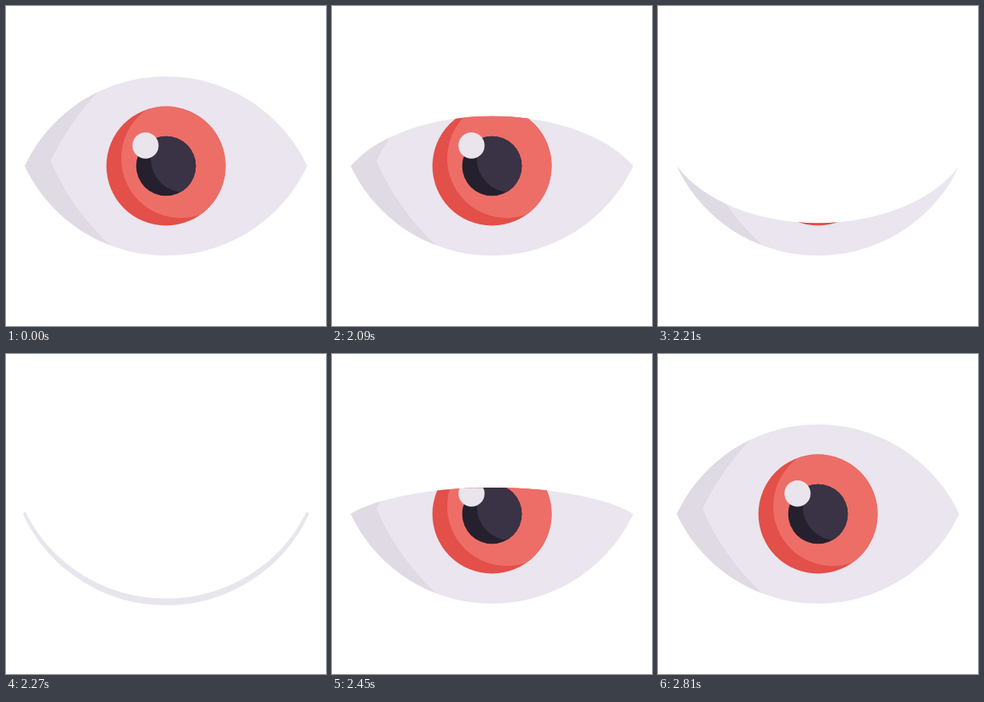
These frames come from a looping animation (400x400 px, 2840 ms). An HTML page without scripts:

```html
<!DOCTYPE html>
<html lang="en">
<head>
<meta charset="utf-8">
<title>Blinking eye</title>
<style>
  html, body { margin: 0; width: 100%; height: 100%; overflow: hidden; background: #fff; }
  svg { display: block; width: 100%; height: 100%; }

  .lid {
    d: path("M23.5 200 C55.7 131.6 124.4 88 200 88 C275.6 88 344.3 131.6 376.5 200 C344.3 268.4 275.6 312 200 312 C124.4 312 55.7 268.4 23.5 200 Z");
    animation: blink 2840ms infinite;
  }
  .lash {
    fill: none;
    stroke: #e9e5ec;
    stroke-width: 0;
    stroke-linejoin: round;
    animation: blink 2840ms infinite, thicken 2840ms linear infinite;
  }

  /* closes 2000-2300 ms, opens 2300-2800 ms */
  @keyframes blink {
    0%, 98.5915%, 100% {
      d: path("M23.5 200 C55.7 131.6 124.4 88 200 88 C275.6 88 344.3 131.6 376.5 200 C344.3 268.4 275.6 312 200 312 C124.4 312 55.7 268.4 23.5 200 Z");
    }
    70.4225% {
      d: path("M23.5 200 C55.7 131.6 124.4 88 200 88 C275.6 88 344.3 131.6 376.5 200 C344.3 268.4 275.6 312 200 312 C124.4 312 55.7 268.4 23.5 200 Z");
      animation-timing-function: cubic-bezier(.36, 0, .6, 1);
    }
    80.9859% {
      d: path("M23.5 200 C55.7 268.4 124.4 312 200 312 C275.6 312 344.3 268.4 376.5 200 C344.3 268.4 275.6 312 200 312 C124.4 312 55.7 268.4 23.5 200 Z");
      animation-timing-function: cubic-bezier(.3, 0, 0, 1);
    }
  }
  @keyframes thicken {
    0%, 78.8732%, 83.0986%, 100% { stroke-width: 0; }
    80.9859% { stroke-width: 8px; }
  }
</style>
</head>
<body>
<svg viewBox="0 0 400 400">
  <defs>
    <clipPath id="open"><path class="lid"/></clipPath>
    <clipPath id="iris"><circle cx="200" cy="200" r="74.5"/></clipPath>
    <clipPath id="pupil"><circle cx="200" cy="200" r="37.3"/></clipPath>
  </defs>
  <g clip-path="url(#open)">
    <rect width="400" height="400" fill="#eae5ee"/>
    <path d="M115 107 Q79.5 145.5 57 191 Q55.5 194 57 196.5 Q80.7 252 130 299 L130 320 H0 V80 H115 Z" fill="#e0dae4"/>
    <circle cx="200" cy="200" r="74.5" fill="#e34f49"/>
    <circle cx="218.5" cy="190.5" r="74.5" fill="#ed6e67" clip-path="url(#iris)"/>
    <circle cx="200" cy="200" r="37.3" fill="#25202d"/>
    <circle cx="223" cy="191" r="42" fill="#393345" clip-path="url(#pupil)"/>
    <circle cx="174.4" cy="174.4" r="16.3" fill="#eae5ec"/>
  </g>
  <path class="lid lash"/>
</svg>
</body>
</html>
```
